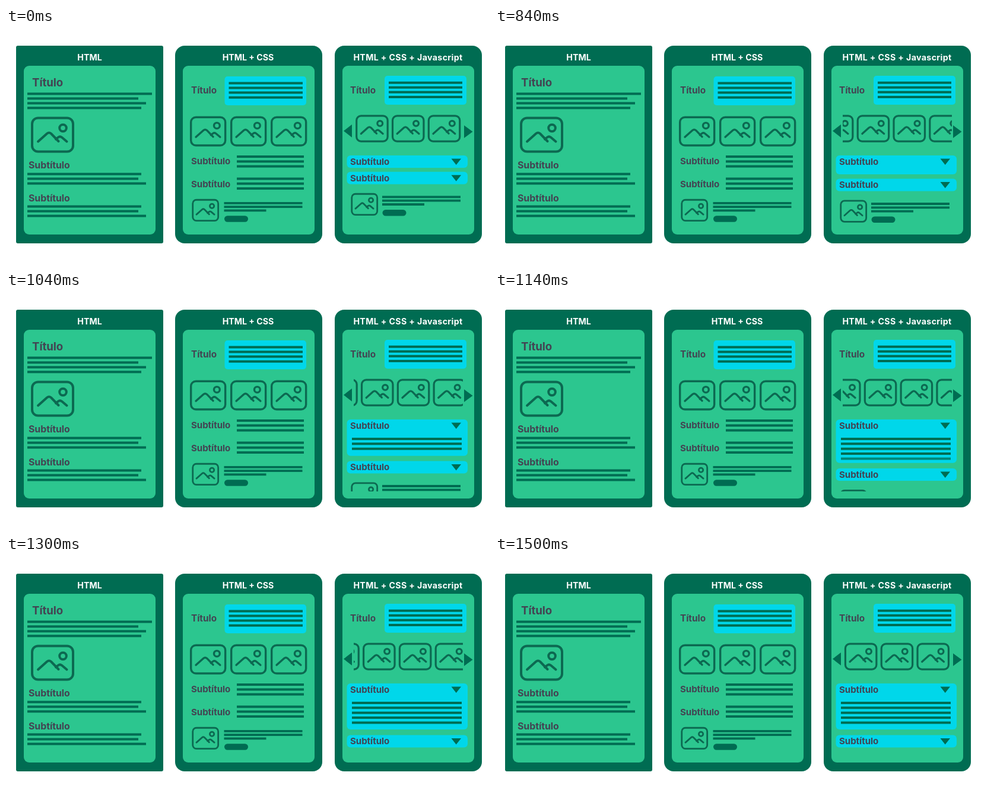
These frames come from a looping animation (814x400 px, 2500 ms). An HTML page:

```html
<!DOCTYPE html>
<html lang="es">
<head>
<meta charset="utf-8">
<title>HTML, CSS, Javascript</title>
<style>
  html, body { margin: 0; width: 100%; height: 100%; overflow: hidden; background: #fff; }
  svg { display: block; width: 814px; height: 400px; }
  text { font-family: Inter, "Open Sans", sans-serif; font-weight: 700; fill: #434352; }
  .head { font-size: 14.2px; fill: #fff; text-anchor: middle; }
  .dark { fill: #006c52; }
  .page { fill: #2cc68f; }
  .cyan { fill: #00d7ea; }
  .line { stroke: #006c52; fill: none; }
  .icon { stroke: #0c6951; fill: none; stroke-linecap: round; stroke-linejoin: round; }
</style>
</head>
<body>
<svg id="stage" viewBox="0 0 814 400"></svg>
<script>
const LOOP = 2500, STEP = 20, PITCH = 60.8;

// [time in ms, distance in px]
const slide = [[740, 0], [760, 2], [840, 20.5], [960, 50.5], [1140, 93.4], [1300, 133.5], [1500, 182.1]];
const open = [[740, 0], [760, 1.4], [840, 11.6], [960, 30], [1140, 55.2], [1280, 59.6]];

const rect = (cls, x, y, w, h, r = 0, id = '') =>
  `<rect id="${id}" class="${cls}" x="${x}" y="${y}" width="${w}" height="${h}" rx="${r}"/>`;
const text = (str, x, y, size) => `<text x="${x}" y="${y}" font-size="${size}">${str}</text>`;
const lines = (x, rows, width = 4) => rows.map(([end, y]) =>
  `<path class="line" stroke-width="${width}" d="M${x} ${y}H${end}"/>`).join('');
const poly = pts => `<polygon class="dark" points="${pts}"/>`;
const group = (id, body) => `<g id="${id}">${body}</g>`;

// Picture symbol drawn in a 73 x 61 box
const icon = (x, y, k, weight) => `<g class="icon" stroke-width="${weight / k}" transform="translate(${x} ${y}) scale(${k})">
  <rect x="2" y="2" width="69" height="57" rx="10"/>
  <circle cx="54" cy="19" r="5.8"/>
  <path d="M12 42L27 28.500Q30.500 25.500 34 28.500L46.500 41.500M42 38L46 34.800Q49 32.500 52 34.800L60.500 42"/></g>`;

const card = (x, r, title, cx, extra = '') =>
  rect('dark', x, 30, 248, 335, r) + rect('page', x + 13, 64, 222, 286, 9) +
  `<text class="head" x="${cx}" y="54.500" ${extra}>${title}</text>`;

const block = (x, y, ix, iy) => icon(ix, iy, .622, 2.8) +
  lines(x, [[x + 132, y], [x + 132, y + 6.3], [x + 71, y + 12.6]], 3.8) +
  rect('dark', x + .5, y + 21.5, 40, 10.5, 5.2);

const plain = card(17, 3, 'HTML', 141) +
  text('Título', 44, 99, 18.6) +
  lines(36, [[246, 111.5], [223, 119.5], [236, 127.5], [228, 135.5]]) +
  icon(42, 150.5, 1, 4) +
  text('Subtítulo', 38, 237.5, 15.8) +
  lines(36, [[228, 247.5], [223, 255.5], [236, 263.5]]) +
  text('Subtítulo', 38, 293.5, 15.8) +
  lines(36, [[228, 302.5], [223, 310.5], [236, 318.5]]);

const styled = card(285, 16, 'HTML + CSS', 408) +
  text('Título', 312, 110.5, 15.3) +
  rect('cyan', 368.5, 82, 137.5, 49, 5) +
  lines(375.5, [93.5, 101.5, 109.5, 117.7].map(y => [500, y])) +
  [310, 378, 446].map(x => icon(x, 149.5, .84, 3.4)).join('') +
  text('Subtítulo', 312, 231, 15) +
  lines(389, [218, 226.2, 234.5].map(y => [502, y])) +
  text('Subtítulo', 312, 269.5, 15) +
  lines(389, [255.5, 263.7, 272].map(y => [502, y])) +
  block(367.5, 296.8, 313.5, 290);

const textRows = [0, 1, 2, 3, 4].map(i => 249 + i * 8.35);

const scripted = card(554, 16, 'HTML + CSS + Javascript', 677.5, 'letter-spacing=".35"') +
  text('Título', 580, 110.5, 15.3) +
  rect('cyan', 638, 81, 138, 49, 5) +
  lines(645, [92.7, 100.7, 108.8, 117].map(y => [769, y])) +
  `<g clip-path="url(#track)">${group('cards',
    [-3, -2, -1, 0, 1, 2].map(i => icon(589.2 + i * PITCH, 147.3, .76, 3.2)).join(''))}</g>` +
  poly('569,174.5 583,163.5 583,185.5') +
  poly('786.5,175.8 772,165 772,186.5') +
  `<g clip-path="url(#fold)">${group('tail', block(634, 286.4, 581.5, 280))}</g>` +
  rect('cyan', 574.5, 216, 203.5, 21, 6, 'panel') +
  text('Subtítulo', 580, 232, 15) +
  poly('750.5,221.5 767,221.5 758.7,232') +
  group('rows', lines(583, textRows.map(y => [768, y]))) +
  group('second', rect('cyan', 574.5, 243.8, 203.5, 21, 6) +
    text('Subtítulo', 580, 259.8, 15) +
    poly('750.5,249.3 767,249.3 758.7,259.8'));

const $ = id => document.getElementById(id);
$('stage').innerHTML = `<defs>
  <clipPath id="track"><rect x="586" y="140" width="184" height="60"/></clipPath>
  <clipPath id="fold"><rect x="567" y="200" width="222" height="138"/></clipPath>
</defs>` + plain + styled + scripted;

const clamp = v => Math.min(1, Math.max(0, v));

// Smooth curve through the table, flat after its last point
function sample(table, t, endSlope) {
  const last = table.length - 1;
  if (t <= table[0][0]) return table[0][1];
  if (t >= table[last][0]) return table[last][1];
  const span = i => table[i + 1][0] - table[i][0];
  const rate = i => (table[i + 1][1] - table[i][1]) / span(i);
  const slope = i => i === 0 ? rate(0) : i === last ? endSlope :
    (rate(i - 1) * span(i) + rate(i) * span(i - 1)) / (span(i - 1) + span(i));
  let i = 0;
  while (t >= table[i + 1][0]) i++;
  const h = span(i), u = (t - table[i][0]) / h, v = 1 - u;
  return table[i][1] * (1 + 2 * u) * v * v + table[i + 1][1] * u * u * (3 - 2 * u) +
    h * u * v * (slope(i) * v - slope(i + 1) * u);
}

const rows = [...$('rows').children];

function draw(ms) {
  const t = Math.floor((ms % LOOP) / STEP) * STEP;
  const x = sample(slide, t, .244), y = sample(open, t, 0);
  const height = 21 + y * .955;
  $('cards').setAttribute('transform', `translate(${x} 0)`);
  $('tail').setAttribute('transform', `translate(0 ${y})`);
  $('second').setAttribute('transform', `translate(0 ${y})`);
  $('panel').setAttribute('height', height);
  rows.forEach((row, i) => row.setAttribute('opacity', clamp((212 + height - textRows[i]) / 4.4)));
}

const start = performance.now();
function tick() {
  draw(performance.now() - start);
  requestAnimationFrame(tick);
}
tick();
</script>
</body>
</html>
```
